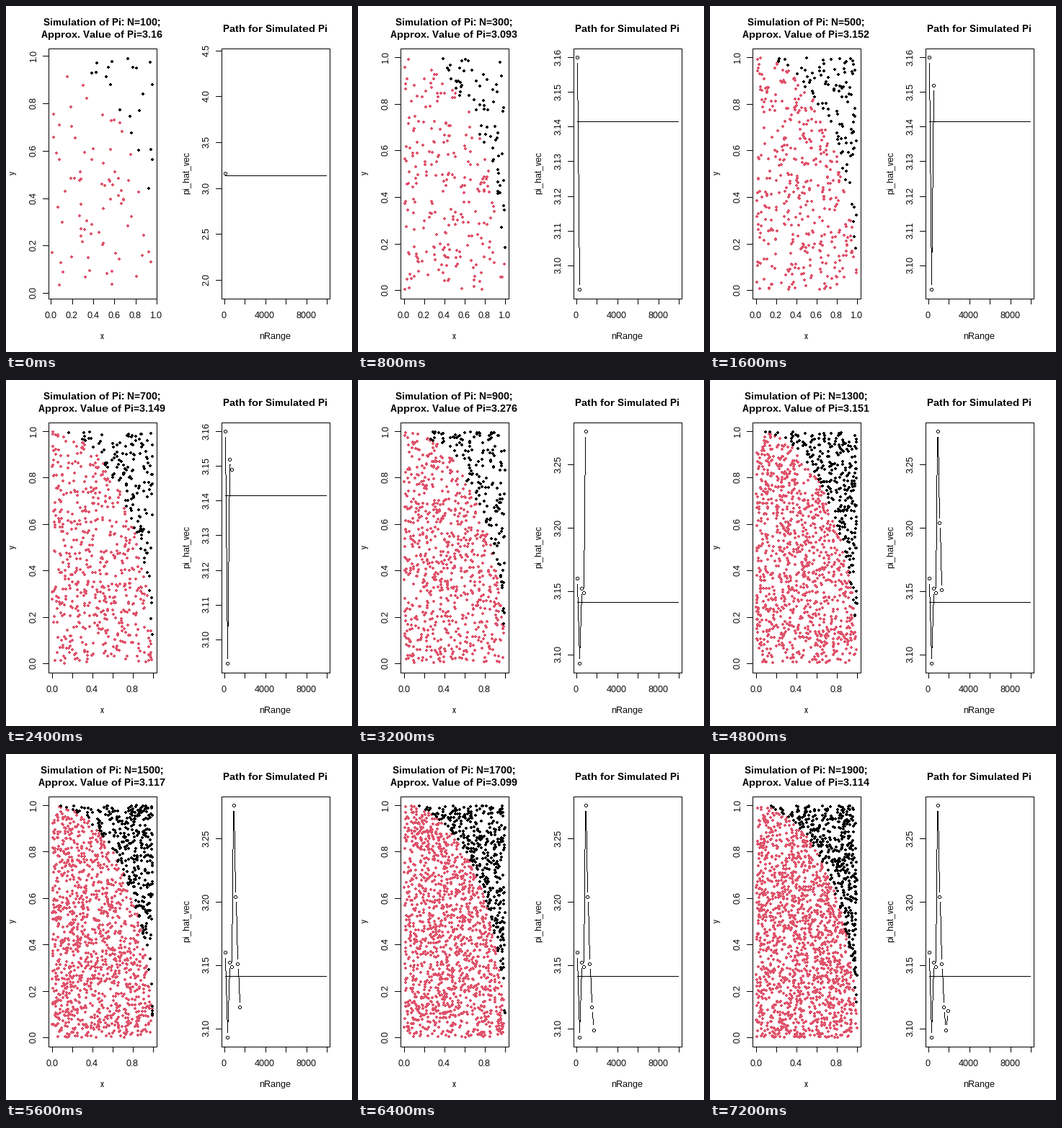
These frames come from a looping animation (480x480 px, 8 s). A matplotlib script:

```python
import matplotlib.pyplot as plt
import numpy as np
from matplotlib.animation import FuncAnimation
from matplotlib.path import Path

plt.rcParams.update({
    "font.family": "Liberation Sans",
    "text.hinting": "default",
    "text.hinting_factor": 1,
})

SIZE = 480
RED, BLACK = "#DF536B", "black"
TOP, BOTTOM = 59.04, 406.56
LEFT_PANEL, RIGHT_PANEL = (59.04, 209.76), (299.04, 449.76)

SIZES = np.arange(100, 2000, 200)
ESTIMATES = np.array([3.16, 3.093, 3.152, 3.149, 3.276,
                      3.204, 3.151, 3.117, 3.099, 3.114])

fig = plt.figure(figsize=(SIZE / 72, SIZE / 72), dpi=72, facecolor="white")
ax = fig.add_axes([0, 0, 1, 1])


def scale(lo, hi, start, end):
    """Map data to pixels, with 4% of padding at both ends."""
    pad = 0.04 * (hi - lo)
    lo, hi = lo - pad, hi + pad
    return lambda v: start + (np.asarray(v) - lo) / (hi - lo) * (end - start)


def disc(r):
    """Pixel disc: a square of half width r without its corner pixels."""
    s = r - 1
    return Path([(-s, -r), (s, -r), (s, -s), (r, -s), (r, s), (s, s), (s, r),
                 (-s, r), (-s, s), (-r, s), (-r, -s), (-s, -s), (-s, -r)])


def dots(x, y, color, marker, size):
    ax.plot(np.floor(x), np.floor(y), ls="none", marker=marker, ms=size,
            mfc=color, mec="none", mew=0)


def line(x0, y0, x1, y1):
    """One pixel wide line without smoothing."""
    x0, y0, x1, y1 = np.floor([x0, y0, x1, y1])
    steps = int(max(abs(x1 - x0), abs(y1 - y0))) + 1
    dots(np.linspace(x0, x1, steps) + 0.5, np.linspace(y0, y1, steps) + 0.5,
         BLACK, "s", 1)


def label(x, y, text, size=12, **style):
    ax.text(x, y, text, fontsize=size, color=BLACK, ha="center",
            va="baseline", rotation_mode="anchor", **style)


def across(x, y, text, **style):
    label(x - 1, y, text, **style)


def upward(x, y, text):
    label(x, y - 1, text, rotation=90)


def title(x, y, text):
    across(x, y, text, size=14.4, weight="bold")


def draw_frame(panel, to_x, to_y, xticks, yticks, xskip, xfmt, yfmt, names):
    left, right = panel
    for y in (TOP, BOTTOM):
        line(left, y, right, y)
    for x in panel:
        line(x, TOP, x, BOTTOM)
    for i, v in enumerate(xticks):
        x = to_x(v)
        line(x, BOTTOM, x, BOTTOM + 7.2)
        if i % xskip == 0:
            across(x, 433, xfmt.format(v))
    for v in yticks:
        y = to_y(v)
        line(left - 7.2, y, left, y)
        upward(left - 17.28, y, yfmt.format(v))
    across((left + right) / 2, 462, names[0])
    upward(left - 46.08, (TOP + BOTTOM) / 2, names[1])


def sample_extent(n):
    """Smallest and largest x, then y; larger samples fill the square."""
    if n == 100:
        return 0.012, 0.963, 0.0155, 0.9925
    if n <= 500:
        return 0.002, 0.998, 0.004, 0.9985
    return 0.0005, 0.9995, 0, 0.9983


def draw_scatter(n, estimate):
    x0, x1, y0, y1 = sample_extent(n)
    to_x = scale(x0, x1, *LEFT_PANEL)
    to_y = scale(y0, y1, BOTTOM, TOP)

    # Keep as many points on each side of the arc as the estimate says
    rng = np.random.default_rng(n)
    x, y = rng.uniform(x0, x1, 4 * n), rng.uniform(y0, y1, 4 * n)
    inside = x * x + y * y <= 1
    hits = round(estimate * n / 4)
    for side, count, color in ((inside, hits, RED), (~inside, n - hits, BLACK)):
        dots(to_x(x[side][:count]), to_y(y[side][:count]), color, disc(2), 4)

    ticks = np.arange(6) / 5
    draw_frame(LEFT_PANEL, to_x, to_y, ticks, ticks, 1 if n <= 500 else 2,
               "{:.1f}", "{:.1f}", ("x", "y"))
    title(134.4, 27, f"Simulation of Pi: N={n};")
    title(134.4, 44, f"Approx. Value of Pi={estimate}")


def draw_path(sizes, values):
    if len(values) == 1:
        lo, hi = 0.6 * values[0], 1.4 * values[0]
        ticks, yfmt = np.arange(2, hi + 0.1, 0.5), "{:.1f}"
    else:
        lo, hi = values.min(), values.max()
        step = 0.01 if hi < 3.2 else 0.05
        ticks, yfmt = np.arange(3.1, hi + 1e-9, step), "{:.2f}"
    to_x = scale(100, 9900, *RIGHT_PANEL)
    to_y = scale(lo, hi, BOTTOM, TOP)
    x, y = to_x(sizes), to_y(values)

    # Connecting lines stop short of the points
    for xa, ya, xb, yb in zip(x, y, x[1:], y[1:]):
        t = 7.2 / np.hypot(xb - xa, yb - ya)
        if t < 0.5:
            dx, dy = t * (xb - xa), t * (yb - ya)
            line(xa + dx, ya + dy, xb - dx, yb - dy)
    dots(x, y, BLACK, disc(2.5), 5)
    dots(x, y, "white", "s", 3)
    line(to_x(100), to_y(np.pi), to_x(9900), to_y(np.pi))

    draw_frame(RIGHT_PANEL, to_x, to_y, np.arange(0, 10001, 2000), ticks, 2,
               "{:.0f}", yfmt, ("nRange", "pi_hat_vec"))
    title(374.4, 36, "Path for Simulated Pi")


def draw(k):
    ax.clear()
    ax.set(xlim=(0, SIZE), ylim=(SIZE, 0))
    ax.axis("off")
    draw_scatter(int(SIZES[k]), float(ESTIMATES[k]))
    draw_path(SIZES[:k + 1], ESTIMATES[:k + 1])
    return []


anim = FuncAnimation(fig, draw, frames=len(SIZES), init_func=lambda: draw(0),
                     interval=800, repeat=True)
plt.show()
```
